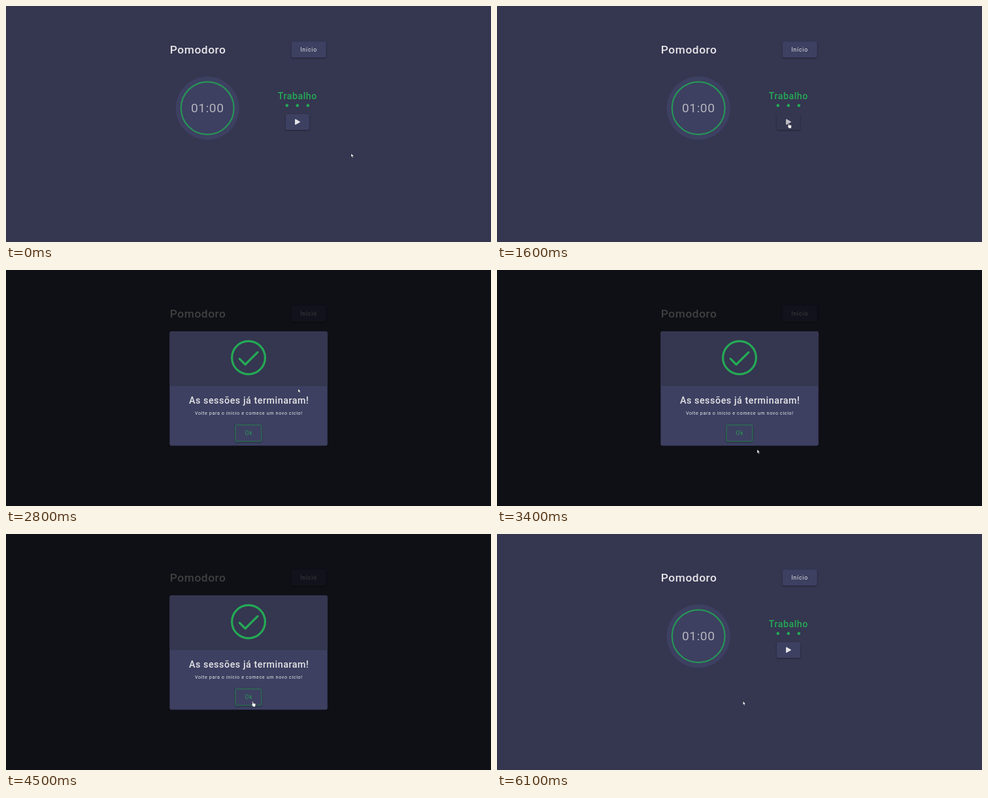
Animation of 742x362 px, one loop 7000 ms. Source, as an HTML page:

```html
<!DOCTYPE html>
<html lang="pt">
<head>
<meta charset="utf-8">
<title>Pomodoro</title>
<style>
  html, body { margin: 0; width: 100%; height: 100%; overflow: hidden; background: #353650; }
  svg { display: block; width: 100%; height: 100%; font-family: Roboto, sans-serif; }
  text { fill: #e6e5e8; letter-spacing: .54px; white-space: pre; }
  .medium { font-weight: 500; }
  .panel { fill: #3d4061; }
  .raised { filter: drop-shadow(0 1.5px 1.2px rgba(0, 0, 0, .38)); }
  .green { fill: #24aa55; }
  .line { fill: none; stroke: #24aa55; stroke-linecap: round; stroke-linejoin: round; }
</style>
</head>
<body>
<svg viewBox="0 0 742 362">
  <rect width="742" height="362" fill="#353650"/>

  <text class="medium" x="250.8" y="72.8" font-size="17.38">Pomodoro</text>
  <rect class="panel raised" x="436.7" y="54.5" width="53" height="24.5" rx="2"/>
  <text x="450.2" y="69.7" font-size="8.69" style="letter-spacing:.82px">Início</text>

  <circle class="panel" cx="308.2" cy="156.7" r="48.5"/>
  <circle class="line" cx="308.2" cy="156.7" r="40.4" stroke-width="2.2" style="stroke:#279456"/>
  <text x="283" y="163.3" font-size="19.2" style="fill:#b4b3bd">01:00</text>

  <text class="medium green" x="415.7" y="143.2" font-size="14.2" style="fill:#24aa55">Trabalho</text>
  <g class="green">
    <circle cx="429.8" cy="152.6" r="2.3"/>
    <circle cx="445.8" cy="152.6" r="2.3"/>
    <circle cx="461.8" cy="152.6" r="2.3"/>
  </g>
  <rect id="play" class="panel raised" x="427.8" y="166" width="36" height="24" rx="2"/>
  <path id="playIcon" d="M442.8 174.2 449.2 177.8 442.8 181.4Z" fill="#e6e5e8" stroke="#e6e5e8" stroke-width="1.4" stroke-linejoin="round"/>

  <g id="modal">
    <rect width="742" height="362" opacity=".72"/>
    <rect class="panel" x="250.4" y="94" width="241.4" height="175.4" rx="3"/>
    <path d="M250.4 178V97a3 3 0 0 1 3-3h235.4a3 3 0 0 1 3 3v81Z" fill="#353650"/>
    <circle class="line" cx="371" cy="134.5" r="25.4" stroke-width="3.2"/>
    <path class="line" d="M357.2 136.2 366 145 385 126.2" stroke-width="3.3"/>
    <text class="medium" x="279.9" y="205" font-size="14.3">As sessões já terminaram!</text>
    <text x="288.9" y="221.6" font-size="7.2" style="letter-spacing:.62px">Volte para o início e comece um novo ciclo!</text>
    <rect id="ok" class="panel raised" x="351" y="237.7" width="39.8" height="25.2" rx="2" stroke="#258a50" stroke-width=".9"/>
    <text x="365.4" y="253.2" font-size="8.69" style="fill:#259a53;letter-spacing:.8px">Ok</text>
  </g>

  <g id="cursor" fill="#fff" stroke="#15151f" stroke-width=".5" stroke-linejoin="round">
    <path id="arrow" d="M0 0V6L1.4 4.8 2.4 7 3.4 6.5 2.4 4.4H4.2Z"/>
    <path id="hand" d="M.4 .8Q1.1-.4 1.8 .8V3.2L4.9 3.8Q5.8 4 5.7 5L5.1 8.8H1.7L-.6 5.6Q-.6 4.5 .4 5.2Z"/>
  </g>
</svg>

<script>
const LOOP = 7000, STEP = 100;
const $ = id => document.getElementById(id);
const show = (node, on) => node.setAttribute('display', on ? 'inline' : 'none');

// Each move is a cubic path followed in discrete steps.
const moves = [
  { start: 400, steps: 7, path: [[528, 226], [510, 252], [412, 195], [445, 179]] },
  { start: 2800, steps: 8, path: [[445, 179], [462, 200], [425, 280], [394, 275]] },
  { start: 3600, steps: 8, path: [[394, 275], [376, 272], [354, 262], [373, 256.5]] },
  { start: 4400, steps: 2, path: [[373, 256.5], [374, 256.5], [375, 256.3], [376.3, 256.3]] }
];

const smooth = u => u * u * (3 - 2 * u);

function bezier([a, b, c, d], u) {
  const v = 1 - u;
  return [0, 1].map(i =>
    v * v * v * a[i] + 3 * v * v * u * b[i] + 3 * v * u * u * c[i] + u * u * u * d[i]);
}

function cursorAt(t) {
  const move = moves.filter(m => t >= m.start).pop();
  if (!move) return moves[0].path[0];
  const done = Math.floor((t - move.start) / STEP) + 1;
  return bezier(move.path, smooth(Math.min(1, done / move.steps)));
}

const inside = ([x, y], left, top, right, bottom) =>
  x >= left && x <= right && y >= top && y <= bottom;

function render(t) {
  const point = cursorAt(t);
  const modalOpen = t >= 1800 && t < 6100;
  const playPressed = t >= 1600 && t < 1800;
  const okPressed = t >= 5900 && t < 6100;
  const pointing = t < 2800
    ? inside(point, 428, 166, 464, 190)
    : modalOpen && inside(point, 351, 238, 391, 263);

  show($('modal'), modalOpen);
  $('play').style.fill = playPressed ? '#353650' : '';
  $('playIcon').style.opacity = playPressed ? .8 : 1;
  $('ok').style.fill = okPressed ? '#353650' : '';
  $('cursor').setAttribute('transform', `translate(${point})`);
  show($('hand'), pointing);
  show($('arrow'), !pointing);
}

function tick() {
  render(performance.now() % LOOP);
  requestAnimationFrame(tick);
}
tick();
</script>
</body>
</html>
```
